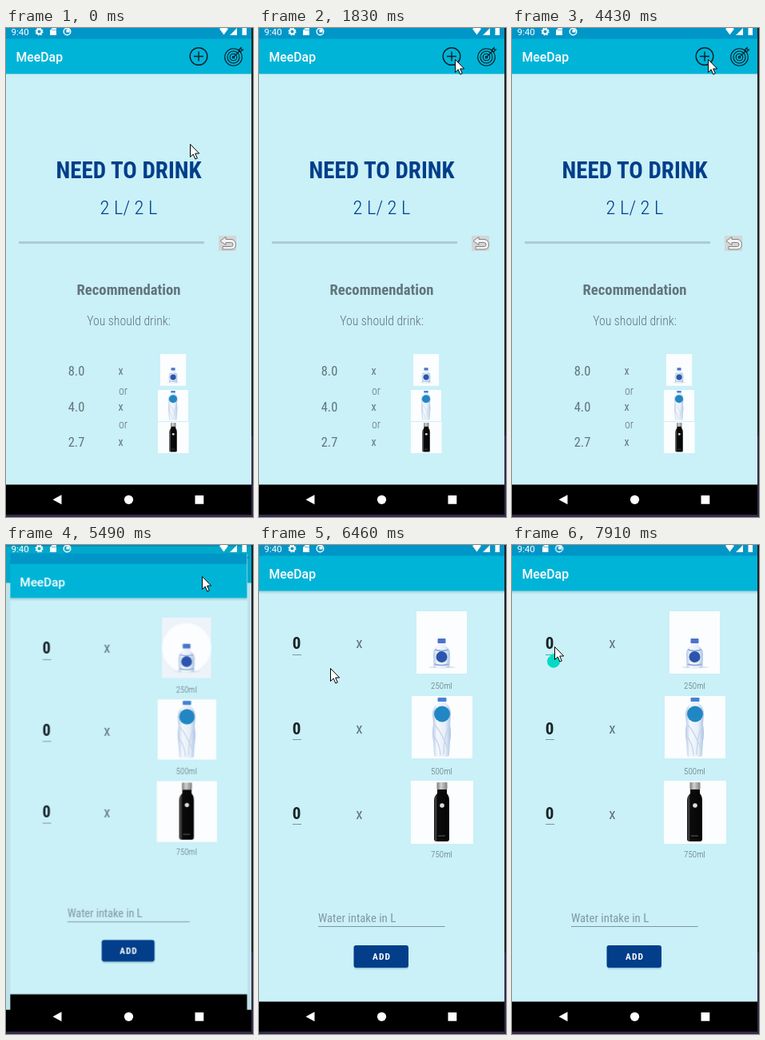
Animation of 309 by 612 pixels, one loop 8 s. Source, as an HTML page:

```html
<!DOCTYPE html>
<html lang="en">
<head>
<meta charset="utf-8">
<title>Water tracker</title>
<style>
html, body { margin: 0; width: 100%; height: 100%; overflow: hidden; background: #1d2228; }
svg.stage { display: block; width: 100vw; height: 100vh; }
text { font-family: "Roboto Condensed", Roboto, sans-serif; font-stretch: 75%; fill: #62757a; }
.mid { text-anchor: middle; }
.wide { font-family: Roboto, sans-serif; font-stretch: 100%; fill: #fff; }
.navy { fill: #023e8a; }
.bold { font-weight: 600; }
.light { font-weight: 300; }
.num { font-size: 21px; font-weight: 600; fill: #172326; }
.times { font-size: 19px; }
.ml { font-size: 11px; fill: #5d7075; }
.ink { fill: none; stroke: #071d24; stroke-width: 1.4; }
.fine { stroke-width: 1.1; }

/* 1% = 80ms */
.step { animation: 8s step-end infinite; }
.screen { transform-origin: 153.5px 308px; }
#home { animation-name: home; }
#add { animation-name: add; }
#shade { animation-name: shade; }
#halo { animation-name: halo; }
#tap { animation-name: tap; }
#mouse { animation-name: mouse; }
#gear { animation-name: gear; }
#notes { animation-name: notes; }
#line { animation-name: line; }
#caret { animation-name: caret; }
#handle { animation-name: handle; }

@keyframes home {
  0% { transform: none; }
  68.625% { transform: scale(1.04); }
  70.5% { transform: scale(1.048); }
  72.375%, 100% { transform: scale(1.05); }
}
@keyframes shade {
  0% { opacity: 0; }
  68.625%, 100% { opacity: .06; }
}
@keyframes add {
  0% { opacity: 0; transform: scale(.85); }
  68.625% { opacity: 1; transform: scale(.965); }
  70.5% { opacity: 1; transform: scale(.992); }
  72.375%, 100% { opacity: 1; transform: none; }
}
@keyframes halo {
  0% { opacity: 1; }
  70.5%, 100% { opacity: 0; }
}
@keyframes tap {
  0% { opacity: 0; }
  52% { opacity: .08; }
  55.375%, 100% { opacity: 0; }
}
@keyframes mouse {
  0% { transform: translate(230px, 145px); }
  7% { transform: translate(241px, 142px); }
  8.875% { transform: translate(243px, 110px); }
  10.375% { transform: translate(244px, 83px); }
  12.25% { transform: translate(245px, 62px); }
  14.125% { transform: translate(245px, 52px); }
  15.625% { transform: translate(245px, 45px); }
  19.125% { transform: translate(245px, 40px); }
  22.875% { transform: translate(245px, 39px); }
  75.5% { transform: translate(243px, 42px); }
  77% { transform: translate(219px, 66px); }
  78.875% { transform: translate(119px, 173px); }
  80.75% { transform: translate(89px, 154px); }
  82.625% { transform: translate(69px, 139px); }
  84.5% { transform: translate(61px, 133px); }
  86.375% { transform: translate(57px, 130px); }
  87.875% { transform: translate(55px, 128px); }
  89.75%, 100% { transform: translate(53px, 127px); }
}
@keyframes gear {
  0% { opacity: 1; }
  89.75%, 100% { opacity: 0; }
}
@keyframes notes {
  0% { transform: none; }
  89.75%, 100% { transform: translateX(-17.5px); }
}
@keyframes line {
  0% { stroke: #7f969d; }
  95.125%, 100% { stroke: #18b9ae; }
}
@keyframes caret {
  0% { opacity: 0; }
  95.125% { opacity: 1; }
  98.875%, 100% { opacity: 0; }
}
@keyframes handle {
  0% { opacity: 0; }
  97%, 100% { opacity: 1; }
}
</style>
</head>
<body>
<svg class="stage" viewBox="0 0 309 612" preserveAspectRatio="none">
<defs>
  <clipPath id="phone"><rect width="307" height="609"/></clipPath>
  <linearGradient id="water">
    <stop offset="0" stop-color="#b4c8e6"/><stop offset=".25" stop-color="#f4f8fd"/>
    <stop offset=".7" stop-color="#e6eef8"/><stop offset="1" stop-color="#aac2e2"/>
  </linearGradient>
  <linearGradient id="steel">
    <stop offset="0" stop-color="#111"/><stop offset=".12" stop-color="#4a4b4d"/>
    <stop offset=".2" stop-color="#0c0c0d"/><stop offset="1" stop-color="#050505"/>
  </linearGradient>
  <linearGradient id="cap">
    <stop offset="0" stop-color="#7d7d7d"/><stop offset=".4" stop-color="#d2d2d2"/>
    <stop offset="1" stop-color="#808080"/>
  </linearGradient>
  <linearGradient id="fall" x2="0" y2="1">
    <stop offset="0" stop-color="#03536b" stop-opacity=".22"/><stop offset="1" stop-color="#03536b" stop-opacity="0"/>
  </linearGradient>

  <g id="smallBottle">
    <ellipse cx="32" cy="70" rx="17" ry="1.500" fill="#dde6ef"/>
    <path d="M27 39h9v4q6 4 6 10l-.5 15q0 3-3 3H24.500q-3 0-3-3L21 53q0-6 6-10z" fill="url(#water)"/>
    <path d="M23 48q8.500 3 17 0M22.500 66q9 3 18 0" fill="none" stroke="#8ea9da" stroke-width="1.500"/>
    <circle cx="31.500" cy="57" r="7" fill="#2c55ad"/>
    <rect x="26.500" y="34" width="10" height="6" rx="1" fill="#4a74cc"/>
  </g>
  <g id="small">
    <rect width="63" height="78" fill="#fbfdfe"/>
    <use href="#smallBottle"/>
  </g>
  <g id="medium">
    <rect width="76" height="78" fill="#fbfdfe"/>
    <path d="M33 6h10v3q6 5 6 14l-1 12q2 12 0 22l-1 16q0 3-3 3H31q-3 0-3-3l-1-16q-2-10 0-22l-1-12q0-9 7-14z" fill="url(#water)"/>
    <path d="M29 36q8 9 17 31M47 38q-6 8-7 35M28 51q7 8 8 23" fill="none" stroke="#c3d3e6" stroke-width="1.200"/>
    <circle cx="38" cy="22.500" r="10" fill="#2187c4"/>
    <rect x="32.500" y="2" width="11" height="5" rx="1" fill="#4583d4"/>
  </g>
  <g id="flask">
    <rect width="78" height="79" fill="#fbfdfe"/>
    <path d="M33 11h12v5q3 3 3 9v48q0 3-3 3H32q-3 0-3-3V25q0-6 4-9z" fill="url(#steel)"/>
    <rect x="32.500" y="2" width="13" height="9" rx="1" fill="url(#cap)"/>
    <circle cx="39" cy="31" r="2.800" fill="#ddd"/>
    <path d="M34 69h9" stroke="#777" stroke-width=".8"/>
  </g>

  <g id="bars">
    <rect width="307" height="611" fill="#caf0f8"/>
    <rect width="307" height="14" fill="#0096c7"/>
    <rect y="13.500" width="307" height="44" fill="#00b4d8"/>
    <text class="wide" x="12.500" y="42" font-size="15.800" font-weight="500">MeeDap</text>
    <rect y="571.500" width="307" height="38" fill="#000"/>
  </g>
</defs>

<rect width="309" height="612" fill="#1d2228"/>
<path d="M307 510h2v102H0v-3h307z" fill="#35294a"/>
<g clip-path="url(#phone)">

  <g id="home" class="screen step">
    <use href="#bars"/>
    <g class="ink">
      <circle cx="241" cy="35.500" r="10.800"/>
      <path d="M235 35.500h12M241 29.500v12"/>
      <g class="fine">
        <circle cx="284.500" cy="36.500" r="10.800"/>
        <circle cx="284.500" cy="36.500" r="7.500"/>
        <circle cx="284.500" cy="36.500" r="4.300"/>
        <circle cx="284.500" cy="36.500" r="1.300"/>
        <path d="M284.500 36.500l8.500-8.500M291.500 29.500v-2.500l2.500-2.500v2.500h2.500l-2.500 2.500z"/>
      </g>
    </g>
    <circle id="tap" class="step" cx="241" cy="35.500" r="14" fill="#fff"/>

    <text class="mid bold navy" x="153.500" y="188" font-size="29">NEED TO DRINK</text>
    <text class="mid light navy" x="153.500" y="233" font-size="24.500">2 L/ 2 L</text>
    <rect x="16" y="267" width="232" height="3" fill="#aecbd3"/>

    <rect x="266" y="260" width="22" height="19" fill="#d3d6d6"/>
    <path d="M275 261.500l-7 5 7 5v-3h6.500q2.500 0 2.500 2.500t-2.500 2.500H271v3.500h11q5.500-.5 5.500-6t-5.500-6.500h-7z" fill="#f3f3f3" stroke="#777" stroke-width=".9" stroke-linejoin="round"/>

    <text class="mid bold" x="153.500" y="334" font-size="18.700">Recommendation</text>
    <text class="mid light" x="153.500" y="372" font-size="15.800">You should drink:</text>
    <g class="mid" font-size="16.500">
      <text x="88" y="435">8.0</text>
      <text x="88" y="479.500">4.0</text>
      <text x="88" y="524">2.7</text>
    </g>
    <g class="mid" font-size="14">
      <text x="143.500" y="433.500">x</text>
      <text class="light" x="146.500" y="458.500">or</text>
      <text x="143.500" y="478.500">x</text>
      <text class="light" x="146.500" y="500.500">or</text>
      <text x="143.500" y="523">x</text>
    </g>
    <use href="#small" transform="translate(193 408) scale(.51)"/>
    <use href="#medium" transform="translate(190 453) scale(.5)"/>
    <use href="#flask" transform="translate(190 493) scale(.495)"/>
  </g>
  <rect id="shade" class="step" width="307" height="609"/>

  <g id="add" class="screen step">
    <use href="#bars"/>
    <rect y="57.500" width="307" height="4" fill="url(#fall)"/>
    <g class="mid">
      <text class="num" x="47" y="130">0</text>
      <text class="num" x="47" y="236.500">0</text>
      <text class="num" x="47" y="342.500">0</text>
      <text class="times" x="125.500" y="129">x</text>
      <text class="times" x="125.500" y="236">x</text>
      <text class="times" x="125.500" y="342.500">x</text>
      <text class="ml light" x="228.500" y="180">250ml</text>
      <text class="ml light" x="228.500" y="286.500">500ml</text>
      <text class="ml light" x="228.500" y="391">750ml</text>
    </g>
    <g stroke="#7f969d">
      <path id="line" class="step" d="M42 137.500h11"/>
      <path d="M42 243.500h11M42 349.500h11M74 477.500h158.500"/>
    </g>
    <use href="#small" x="197" y="83"/>
    <g id="halo" class="step">
      <rect x="197" y="83" width="63" height="78" fill="#edf3f9"/>
      <circle cx="228.500" cy="122" r="32" fill="#fbfdfe"/>
      <use href="#smallBottle" x="197" y="83"/>
    </g>
    <use href="#medium" x="191" y="189"/>
    <use href="#flask" x="190" y="295"/>

    <text x="74" y="472" font-size="14.800" style="fill:#82989e">Water intake in L</text>
    <rect x="119" y="503" width="68" height="28" rx="3" fill="#03536b" opacity=".2"/>
    <rect x="118.500" y="501" width="68.500" height="28" rx="3" fill="#023e8a"/>
    <text class="mid bold" x="153.500" y="519" font-size="11.500" letter-spacing="1" style="fill:#fff">ADD</text>

    <path id="caret" class="step" d="M52.500 110v24" stroke="#03dac5" stroke-width="1.500"/>
    <path id="handle" class="step" d="M52 135.500l5.600 4.500a8 8 0 1 1-11.200 0z" fill="#03dac5"/>
  </g>

  <g fill="#fff">
    <text class="wide" x="6.500" y="9" font-size="11.500">9:40</text>
    <g id="gear" class="step">
      <circle cx="41.500" cy="4.500" r="3" fill="none" stroke="#fff" stroke-width="2"/>
      <circle cx="41.500" cy="4.500" r="4.300" fill="none" stroke="#fff" stroke-width="1.500" stroke-dasharray="1.700 1.677"/>
    </g>
    <g id="notes" class="step">
      <path d="M58 0h5v9h-8V3z"/>
      <path d="M58 1.500v2M60 1.500v2M62 1.500v2" stroke="#0096c7" stroke-width=".8"/>
      <circle cx="76.500" cy="4.500" r="4.300" fill="none" stroke="#fff" stroke-width="1.400"/>
      <path d="M75.500 1.500h4v4h-4z"/>
    </g>
    <path d="M267 1q5.500-3.500 11 0l-5.500 7.500zM289 0v9h-9zM295.500 0h5.500v9h-5.500z"/>
  </g>
  <rect y="581.700" width="307" height="28" fill="#000"/>
  <g fill="#fff">
    <path d="M58.500 590.300l11-6v12z"/>
    <circle cx="153.500" cy="590.300" r="5.600"/>
    <rect x="236.500" y="585" width="10.800" height="10.800" rx=".5"/>
  </g>
</g>

<path id="mouse" class="step" d="M.5.5v16l3.700-3.500 2.600 6 2.500-1-2.600-6h5z" fill="#fff" stroke="#000"/>
</svg>
</body>
</html>
```
